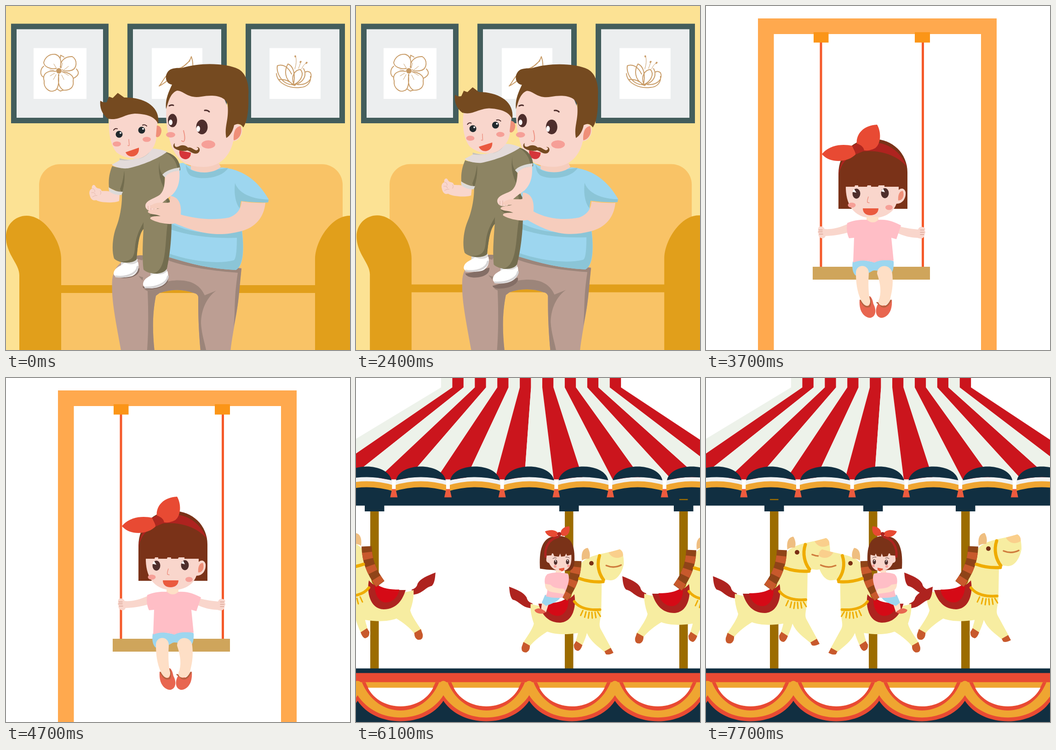
An HTML page that plays this animation: 748 by 748 pixels, repeating every 8100 ms.

```html
<!DOCTYPE html>
<html lang="en">
<head>
<meta charset="utf-8">
<title>Family fun</title>
<style>
html, body { margin: 0; width: 100%; height: 100%; overflow: hidden; background: #fff }
svg { display: block; width: 100%; height: 100% }
.line { fill: none; stroke-linecap: round; stroke-linejoin: round }
.skin { fill: #f9d6cc }
.cheek { fill: #f69f97 }
.ear { fill: #ef8f78 }
.hair { fill: #754a20 }
.girl { fill: #7a3218 }
.red { fill: #ae231f }
.bow { fill: #e84a33 }
.mouth { fill: #ea5a3f }
.eye { fill: #4e2e2c }
.pale { fill: #fedfc6 }
.pink { fill: #ffbec6 }
.blue { fill: #9dd6ef }
.shade { fill: #8bc5d7 }
.arm { fill: #f6cdbd }
.hoof { fill: #c8592c }
.shoe { fill: #e86650 }
.gold { stroke: #efac00 }
</style>
</head>
<body>
<svg viewBox="0 0 748 748">
<defs>
  <g id="horse">
    <path class="red" d="M139 460L137 471C115 470 110 455 95 452C88 445 88 430 87 423C105 430 120 436 126 447C128 455 132 458 139 460Z"/>
    <path fill="#f7eda1" d="M135 461C165 472 205 470 225 445L242 380Q248 366 262 360C280 350 310 348 333 340Q342 345 342 372C338 395 325 410 312 409C302 408 297 405 293 410L292 470C292 495 285 505 290 516L314 560L299 568C285 556 268 545 260 526Q258 535 250 553L234 548C238 535 240 528 240 526C215 530 190 530 172 523C160 530 140 545 133 556L117 549C130 530 140 515 142 505Q133 480 135 461Z"/>
    <path class="hoof" d="M119 546L133 554Q134 565 126 569Q113 571 115 557ZM236 544L250 553Q246 565 240 566Q230 564 231 552ZM299 567L313 559L319 570Q308 576 302 573Z"/>
    <path fill="#efbe80" d="M249 365C247 350 250 338 262 337C267 345 268 355 265 361Q255 360 249 365Z"/>
    <path fill="#facf8c" d="M308 347L333 340C340 344 341 350 340 355C328 362 315 360 308 347Z"/>
    <path class="line" stroke="#d07d3e" stroke-width="3.5" d="M303 376Q320 383 336 375"/>
    <circle cx="270" cy="371" r="5" fill="#7a2f14"/>
    <path class="red" d="M152 461C165 461 215 462 232 440C237 465 230 502 200 503C170 503 158 480 152 461Z"/>
    <path fill="#d50a16" d="M166 460C185 460 205 458 218 446C222 465 212 488 195 488C180 488 168 475 166 460Z"/>
    <path fill="none" stroke="#8f4418" stroke-width="22" d="M237 366C236 395 228 420 207 448"/>
    <path fill="none" stroke="#c8592c" stroke-width="22" stroke-dasharray="15 15" stroke-dashoffset="-13" d="M237 366C236 395 228 420 207 448"/>
    <path class="line gold" stroke-width="7" d="M288 354C281 375 287 395 297 408M244 405C260 411 280 413 296 412"/>
    <path class="line gold" stroke-width="6" d="M232 456C243 471 265 476 289 474"/>
    <path class="line gold" stroke-width="3" d="M251 476L246 487M258 479L255 491M265 480L263 493M271 480L272 493M278 480L280 492M284 479L290 489"/>
  </g>
  <g id="rider" transform="translate(-159 -33.5)">
    <path class="girl" d="M316 416C314 380 318 348 350 345C385 343 392 365 391 400C390 415 385 421 376 421L330 418Z"/>
    <path class="skin" d="M330 383L384 383C386 405 382 421 362 421C347 421 339 412 336 404Q328 402 330 394Z"/>
    <path class="girl" d="M328 388L341 387L343 379L347 389L357 390L360 383L362 390L370 389L373 383L375 388L388 385C388 345 335 345 328 388Z"/>
    <path class="line" stroke="#ae231f" stroke-width="5" d="M328 390C326 370 335 352 355 347"/>
    <path class="bow" d="M327 335C340 330 350 332 355 338L353 345C345 350 332 347 327 335ZM361 338C362 328 372 324 380 324C382 335 378 345 368 345Q362 346 361 338Z"/>
    <circle class="red" cx="358" cy="341" r="4.5"/>
    <ellipse class="eye" cx="350" cy="402" rx="3.7" ry="5.5"/>
    <ellipse class="eye" cx="376" cy="401" rx="3.5" ry="5.5"/>
    <path fill="#fff" d="M348 398h3v4zM374 397h3v4z"/>
    <path class="line" stroke="#4e2e2c" stroke-width="1" d="M344 394q4-3 8-1M372 391q5-1 8 2"/>
    <circle class="cheek" cx="349" cy="411" r="3"/><circle class="cheek" cx="378" cy="410" r="3"/>
    <path class="mouth" d="M357 416L369 414Q370 421 363 422Q358 421 357 416Z"/>
    <path class="pale" d="M350 420H362V428H350Z"/>
    <path class="pale" d="M321 487L335 493L329 511L318 507Z"/>
    <path class="blue" d="M327 473L361 477C357 487 343 492 329 497L320 490Z"/>
    <path class="pink" d="M332 428C345 423 365 424 377 427C383 440 374 462 365 479Q345 481 329 476C333 465 334 458 327 451Q324 435 332 428Z"/>
    <path class="pale" d="M327 449L339 451C345 458 355 459 368 460Q374 468 366 471C350 467 326 470 327 449Z"/>
    <path class="shoe" d="M304 506Q310 501 318 503L328 509Q327 514 318 514Q306 513 304 506Z"/>
  </g>
  <path id="sofaArm" fill="#e19f1b" d="M29 760V585C29 560 0 540 0 502C0 475 20 456 45 456C85 456 120 512 120 550V760Z"/>
</defs>

<g id="home">
  <path fill="#fce294" d="M0 0H748V748H0Z"/>
  <g fill="#eceeef" stroke="#435d5c" stroke-width="12">
    <path d="M17 44.5H217V249H17ZM270 44.5H474V249H270ZM527 44.5H731V249H527Z"/>
  </g>
  <path fill="#fff" d="M60 91.500H175V202H60ZM317 91.500H427V202H317ZM573 91.500H684V202H573Z"/>
  <g class="line" stroke="#c89b66" stroke-width="1.9">
    <path d="M109 136C96 138 83 132 82 123C86 108 98 104 107 105C117 108 122 118 118 133M119 134C117 120 128 109 144 110C156 116 155 137 142 140Q130 143 122 139M122 143C137 144 149 152 146 163C148 176 140 184 125 183C112 176 113 160 115 149M114 149C116 168 113 183 105 184C95 189 81 178 83 163C78 147 90 140 108 142M82 131C75 136 73 148 80 154M118 113L119 107L126 111M153 137C161 145 157 152 147 157M112 181L118 185L124 183"/>
    <path stroke-width="1" d="M106 146L96 152M109 149L103 160M121 150L126 160M124 144L136 151M110 136L104 126M120 135L123 124M104 140L95 139M126 139L136 131"/>
    <circle cx="115" cy="141" r="5" fill="#c89b66"/>
    <path d="M333 174C342 164 344 153 356 145C382 135 398 127 403 110C408 124 407 140 404 160M333 174C350 166 375 140 400 119"/>
    <path d="M625 171C600 172 587 145 590 130C602 125 614 133 621 148M625 171C605 160 605 140 613 126C625 130 630 150 625 171M626 171C618 150 630 139 640 138C650 148 640 165 626 171M629 171C648 165 655 150 647 136M634 171C660 172 667 155 662 145Q656 140 650 144M588 147C590 168 615 180 640 177C655 177 664 165 662 153M594 160Q612 158 624 171"/>
    <path stroke-width="1" d="M628 137Q633 122 630 110M636 136L641 122M643 137Q646 128 653 124"/>
    <path stroke-width="3.500" d="M629 109v1M641 121l-1 1M653 124l1-1M622 170l6 2"/>
  </g>
  <g id="room">
    <path fill="#f9c366" d="M72 760V389A45 45 0 0 1 117 344H687A45 45 0 0 1 732 389V760Z"/>
    <path fill="#e19f1b" d="M115 607H680V624H115Z"/>
    <use href="#sofaArm"/><use href="#sofaArm" transform="matrix(-1 0 0 1 792 0)"/>
    <path fill="#bc9e93" d="M231 595C235 560 260 545 300 543L512 570L506 625C505 660 492 710 487 760H424C418 700 418 660 418 632Q416 625 408 624Q372 611 334 624L326 630C318 670 318 710 324 760H252C240 690 228 640 231 595Z"/>
    <path fill="#9c857a" d="M300 616C325 612 340 598 365 597C400 594 422 606 432 629L457 619C437 633 424 660 424 690C426 720 434 735 437 760H424C418 700 418 660 418 632Q416 625 408 624Q372 611 334 624L326 630C318 670 318 710 324 760H306C311 700 309 650 308 620ZM350 544L512 571L508 612C505 650 499 680 495 698C499 660 495 640 504 580C460 577 390 568 350 552ZM272 546Q290 540 302 543L296 553Q285 550 272 546ZM288 587L298 590L297 597Z"/>
    <path fill="#846e66" d="M237 583C255 582 270 575 290 570C292 585 275 592 255 592Q240 591 237 583ZM297 610C315 606 335 596 352 592C356 605 335 616 312 616Q298 616 297 610Z"/>
    <path class="blue" d="M370 343L385 341Q420 362 470 351C510 355 545 375 571 420L570 427Q540 428 511 424C506 440 512 470 515 505C517 540 515 565 500 574C450 572 400 562 350 543L356 470L360 390Z"/>
    <path class="shade" d="M351 537C400 555 460 562 495 553Q502 550 502 504C450 506 400 500 358 486V472C400 495 460 500 512 484C519 530 515 570 498 574C440 571 400 560 350 545ZM498 385C505 405 530 420 571 421L570 427Q540 428 511 424L508 440C500 430 495 410 498 385ZM391 344C395 360 430 368 455 356L483 352C470 375 420 380 400 368Q391 360 391 344Z"/>
    <path class="arm" d="M402 340H462L467 350C455 362 425 367 402 355Z"/>
    <path class="skin" d="M349 220C350 200 358 185 372 183L400 190H470L490 240L495 258C512 252 518 270 510 283Q504 294 494 294C488 325 465 350 430 350C390 350 375 335 362 310C352 285 346 250 349 220Z"/>
    <path class="ear" d="M510 261C498 263 494 275 495 292C508 290 515 275 510 261Z"/>
    <path class="hair" d="M348 224C346 205 352 190 361 171C343 168 344 143 360 137C370 134 376 135 382 135C420 122 480 124 505 137C524 147 529 175 527 195C528 225 525 250 516 264Q508 252 496 259C494 270 488 282 479 287C474 260 485 250 482 215C478 195 450 192 425 197C395 202 388 185 372 184C355 190 352 215 348 224Z"/>
    <ellipse class="eye" cx="362" cy="249" rx="10" ry="14.500"/><ellipse class="eye" cx="426" cy="263" rx="12.500" ry="16"/>
    <ellipse cx="358" cy="253" rx="4" ry="6" fill="#fff"/><ellipse cx="418" cy="267" rx="4" ry="6.500" fill="#fff"/>
    <path class="line" stroke="#4e2e2c" stroke-width="3" d="M355 217Q360 214 364 216M432 227Q438 226 442 230"/>
    <ellipse class="cheek" cx="358" cy="280" rx="10" ry="6"/><ellipse class="cheek" cx="440" cy="301" rx="15" ry="9"/>
    <path class="line" stroke="#ee9384" stroke-width="2" d="M386 271Q390 285 388 292Q386 297 382 293"/>
    <path fill="#d5353a" d="M377 314L402 319C402 330 395 334 388 333C380 331 376 325 377 314Z"/>
    <path class="hair" d="M367 298C365 308 372 308 378 304C386 301 392 304 396 308C404 305 411 317 416 313C420 311 418 308 414 307C422 305 424 316 417 320C408 324 400 315 394 314C386 317 372 314 366 309C363 306 363 301 367 298Z"/>
  </g>
  <g id="baby">
    <path fill="#dcdad9" d="M250 550H286V566H250ZM314 573H350V589H314Z"/>
    <path fill="#fff" d="M234 582C235 568 250 566 258 558Q275 566 287 556C290 568 288 580 275 587C260 592 234 592 234 582ZM298 605C299 591 314 588 322 581Q340 588 351 576C355 590 352 601 339 608C324 616 298 617 298 605Z"/>
    <path class="line" stroke="#d6d4d5" stroke-width="4" d="M239 588C260 591 284 583 286 567M303 612C325 613 350 604 352 588"/>
    <path class="skin" d="M247 410C228 400 215 403 208 402C205 394 199 399 195 393C192 385 185 390 187 397C182 399 180 405 182 411C184 421 190 424 196 422C205 428 235 429 246 424Z"/>
    <path class="line" stroke="#e5b8ab" stroke-width="1" d="M188 397Q194 398 193 404M186 406Q193 404 194 410M188 415Q194 411 198 412M205 402Q208 406 205 410"/>
    <path fill="#8d8463" d="M231 348C250 357 290 345 345 317C370 322 379 340 379 357L345 370C347 390 345 400 341 408L357 425C362 470 358 520 350 570C345 585 310 585 299 573C296 550 297 520 299 485C290 495 286 520 284 551C275 561 245 560 235 549C229 530 232 500 240 480C248 460 253 430 252 408L224 395C222 375 226 360 231 348Z"/>
    <path fill="#736d4f" d="M345 404L357 425C364 480 357 540 350 570Q345 583 318 582C350 577 345 520 351 475C335 472 322 462 312 455L350 430ZM299 485C290 492 286 520 284 551Q275 561 246 556C275 556 278 545 280 530C282 500 290 488 299 470ZM345 317C370 322 379 340 379 357L373 355Q370 330 345 317ZM257 358Q260 380 252 408L248 398Q255 380 257 358ZM334 336Q331 360 345 372L343 395Q328 365 334 336Z"/>
    <path fill="#dcdad9" d="M223 394Q236 404 254 404L251 411Q232 411 224 402ZM340 367Q350 355 378 351L377 359Q358 358 346 373Z"/>
    <path class="skin" d="M346 372C355 360 370 358 377 359C379 385 372 400 362 410C345 423 333 432 326 444C310 450 300 440 304 430C310 420 325 418 335 410C345 400 345 385 346 372Z"/>
    <path class="line" stroke="#e5b8ab" stroke-width="1.500" d="M309 443V435M315 445V434M321 445L323 434"/>
    <path fill="#e3dbda" d="M230 345C242 338 246 337 250 332C280 338 300 328 316 310C330 310 342 313 350 317C335 330 295 347 265 353C250 354 235 350 230 345Z"/>
    <path fill="#c6c2ba" d="M247 331C280 342 304 330 317 309Q305 340 247 335Z"/>
    <path class="skin" d="M226 238C221 265 225 300 240 318C260 334 290 336 305 324C320 312 328 300 328 270L330 245L300 230Z"/>
    <path class="ear" d="M328 260C336 260 340 268 337 277C334 286 327 287 326 283Z"/>
    <path class="hair" d="M205 206Q212 211 219 209L224 197L232 200L243 189L257 199C300 198 336 218 331 256C325 245 315 235 280 234C255 236 245 250 222 245C212 238 203 225 205 206Z"/>
    <circle cx="246" cy="279" r="7.500" fill="#21292d"/><circle cx="295" cy="270" r="7.500" fill="#21292d"/>
    <circle cx="249" cy="276" r="2" fill="#fff"/><circle cx="298" cy="267" r="2" fill="#fff"/>
    <path class="line" stroke="#4e2e2c" stroke-width="2" d="M234 270Q237 265 242 267M297 259Q302 257 306 261"/>
    <ellipse class="cheek" cx="241" cy="300" rx="9" ry="5.500"/><ellipse class="cheek" cx="306" cy="290" rx="9" ry="5.500"/>
    <path class="line" stroke="#ee9384" stroke-width="1.500" d="M267 290L268 303Q267 305 265 303"/>
    <path class="mouth" d="M260 318L289 308C290 320 283 326 276 327C267 328 262 323 260 318Z"/>
  </g>
  <path id="forearm" class="arm"/>
  <path id="hand" class="arm" d="M380 455C382 435 378 415 357 413L356 427C345 430 332 424 318 432C310 437 314 441 322 440L334 440C322 443 306 443 309 449C316 454 326 452 336 457C324 457 312 457 314 463C325 470 345 474 356 474C368 474 376 470 380 466Z"/>
</g>

<g id="swing">
  <path fill="#fff" d="M0 0H748V748H0Z"/>
  <path fill="#ffa94e" d="M113 748V27H632V748H598V61H147.500V748Z"/>
  <g id="swinger">
    <path fill="#cfa55b" d="M232 567H487V595H232Z"/>
    <path fill="none" stroke="#f55a2b" stroke-width="5" d="M250 78V567M471.500 78V567"/>
    <path fill="#fb9517" d="M234 57H266.500V79.500H234ZM454 57H487V79.500H454Z"/>
    <path class="girl" d="M288 441V365C288 320 320 289 363 289C405 289 438 320 438 362V441Z"/>
    <path class="skin" d="M304 390C303 430 320 461 362 461C390 461 408 448 414 430C428 430 435 418 434 405C432 396 424 395 419 400V390Z"/>
    <path class="ear" d="M428 402C420 402 417 412 418 423C428 423 432 412 428 402Z"/>
    <path class="girl" d="M302 393H323L330 373L331 393H350L357 373L359 393H374L388 364V393H421L436 360C420 320 310 320 290 360Z"/>
    <path class="red" d="M288 374C290 350 300 332 330 318C370 310 415 322 437 350C425 322 405 303 377 298L330 306C300 325 288 345 288 374Z"/>
    <path class="bow" d="M252 322C270 300 300 300 318 304L326 322C310 340 270 344 252 322ZM328 303C325 280 340 260 372 258C382 275 380 300 368 309C355 316 343 315 340 312Z"/>
    <path fill="#ae281f" d="M317 304L328 299Q343 304 344 315L325 323Q325 312 317 304Z"/>
    <ellipse class="eye" cx="327" cy="408" rx="8.500" ry="11"/><ellipse class="eye" cx="389" cy="407" rx="8.500" ry="11"/>
    <path fill="#fff" d="M318 404L322 398L327 406ZM381 403L385 397L389 405Z"/>
    <ellipse class="cheek" cx="317" cy="433" rx="8.500" ry="5.500"/><ellipse class="cheek" cx="398" cy="438" rx="8" ry="5.500"/>
    <path class="line" stroke="#ee9384" stroke-width="1.500" d="M353 415Q350 424 351 427L355 428"/>
    <path class="mouth" d="M341 440H375C375 450 367 455 358 455C347 455 341 449 341 440Z"/>
    <path class="skin" d="M308 474C290 482 275 486 258 485Q254 477 246 480Q242 484 245 488Q241 491 245 495Q243 503 252 505Q258 506 260 500C280 500 295 496 311 492ZM420 479C435 483 450 485 461 486Q464 478 473 481Q479 484 475 488Q479 492 475 496Q476 504 467 506L459 504C445 504 430 500 415 493Z"/>
    <path class="line" stroke="#dca799" stroke-width="1.500" d="M245 487H253M245 491H253M246 496H254M466 487H474M466 492H474M466 497H474"/>
    <path class="pale" d="M349 458H375V468L362 474L349 468Z"/>
    <path class="blue" d="M319 556C335 548 350 555 363 556C380 550 395 548 408 555C409 570 406 582 398 585Q370 572 362 576L355 580L325 586C319 580 317 570 319 556Z"/>
    <path class="pink" d="M307 472C320 466 335 464 350 465Q363 476 375 465C395 463 410 470 424 477L414 507L403 504L408 554Q380 550 366 558Q340 549 320 558L322 504L311 505Q304 490 307 472Z"/>
    <path class="shoe" id="shoe" d="M334 638Q333 650 336 660C340 672 350 679 358 678C370 675 371 660 364 648C362 636 358 630 354 631L355 648Q345 658 334 638Z"/>
    <use href="#shoe" transform="matrix(-1 0 0 1 738 0)"/>
    <path class="line" stroke="#b5613f" stroke-width="3" d="M336 640Q345 658 356 653Q360 642 355 633M402 640Q393 658 382 653Q378 648 372 645"/>
    <path class="pale" d="M326 580C326 560 355 560 354 582C352 610 354 630 357 640C358 656 345 656 337 640C328 620 326 600 326 580ZM372 582C372 560 403 560 405 582C408 610 403 625 400 640C392 656 374 654 375 642C382 625 380 605 372 582Z"/>
  </g>
</g>

<g id="ride">
  <path fill="#fff" d="M0 0H748V760H0Z"/>
  <g id="poles"></g>
  <g id="tent" transform="translate(0 -1.500)"></g>
  <g id="horses"></g>
</g>
</svg>
<script>
const $ = id => document.getElementById(id);
const shape = (fill, d) => `<path fill="${fill}" d="${d}"/>`;
const navy = '#112f41', coral = '#e84a33', amber = '#efa531', brass = '#9c6c00';

function tent() {
  let s = '';
  for (let i = 0; i < 16; i++) {
    const x = 185 + 24.45 * i, b = -146 + 64 * i;
    s += shape(i % 2 ? '#cb151d' : '#edf2ea',
      `M${x} -5V22L${b} 222H${b + 64}L${x + 24.45} 22V-5Z`);
  }
  s += shape(navy, 'M0 238H748V279H0Z');
  for (let i = 0; i < 7; i++) {
    const c = 23.3 + 117.8 * i, l = c - 59, r = c + 59;
    const band = (top, bottom) =>
      `M${l} ${top}Q${c} ${top - 18} ${r} ${top}V${bottom}Q${c} ${bottom - 18} ${l} ${bottom}Z`;
    s += shape('#f0f1f2', band(226, 237)) + shape(amber, band(235, 248)) +
      shape(navy, `M${c - 54} 224C${c - 46} 184 ${c + 46} 184 ${c + 54} 224Q${c} 210 ${c - 54} 224Z`);
  }
  for (let i = 0; i < 6; i++) {
    const x = 82.3 + 117.7 * i;
    s += shape('#fff', `M${x - 4} 223H${x + 4}V244H${x - 4}Z`) +
      shape('#ed5b3e', `M${x - 4} 243H${x + 4}L${x + 8} 261H${x - 8}Z`);
  }
  s += shape(navy, 'M0 633H748V760H0Z') + shape(coral, 'M0 643H748V664H0Z');
  // nested curves of the festoons, from the outside in
  const rings = [[coral, 93.5, 703, 55, 763], [amber, 93.5, 691, 52, 756],
    [coral, 84, 663, 50, 745], [amber, 76, 663, 48, 733], ['#fff', 71, 675, 44, 729]];
  for (const [fill, w, y, k, low] of rings)
    for (let c = -89.7; c < 850; c += 186.5) {
      const top = fill == '#fff' ? y : 663;
      s += shape(fill, `M${c - w} ${top}V${y}C${c - k} ${low} ${c + k} ${low} ${c + w} ${y}V${top}Z`);
    }
  for (let x = 3.5; x < 748; x += 186.5) s += `<circle cx="${x}" cy="669" r="9" fill="${amber}"/>`;
  return s;
}
$('tent').innerHTML = tent();

// pole position at each step, negative when facing left
const riders = [
  { dy: 8, x: [630, 712, -565, -408, -270, 148], tall: true },
  { dy: 0, x: [-121, -40, 95, 220, 392, 564] },
  { dy: 32, x: [379, 463, 547, 631, -574, -363], girl: true }
];
const tilt = [0, -1, -2.5, -4, -5.2, -1.5, 0.4, 1, 1.5];
const lift = [0, -4, -7, -8, -7, -7.5, -6, -3, -11];
const shrink = [0, 0.5, 0.7, 0.9, 1];

function drawHome(i) {
  const k = 1 - 0.0045 * shrink[Math.min(i, 4)];
  $('room').setAttribute('transform', `translate(295 270) scale(${k}) translate(-295 -270)`);
  $('baby').setAttribute('transform', `translate(0 ${lift[i]}) rotate(${tilt[i]} 300 590)`);
  // the hand follows the baby, the elbow stays
  const a = tilt[i] * Math.PI / 180;
  const dx = 225 * Math.sin(a), dy = 45 * Math.sin(a) + lift[i] * 0.8;
  $('hand').setAttribute('transform', `translate(${dx} ${dy})`);
  const p = (x, y) => `${x + dx} ${y + dy}`;
  $('forearm').setAttribute('d', `M512 425Q540 429 564 428C561 460 542 482 510 490
    C470 500 430 500 ${p(366, 472)}L${p(378, 453)}C415 464 455 466 485 460Q511 450 512 425Z`);
}

function drawRide(i) {
  const bar = (l, top, r, bottom) => `M${l} ${top}H${r}V${bottom}H${l}Z`;
  const small = 'transform="translate(4.84 8) scale(.978)"';
  let poles = '', horses = '';
  for (const { dy, x: xs, girl, tall } of riders) {
    const x = Math.abs(xs[i]), side = Math.sign(xs[i]);
    poles += shape(brass, bar(x - 9, 275, x + 9.5, 632)) +
      shape(navy, bar(x - 21, 275, x + 21.5, 290));
    if (tall && i) horses += shape(brass, bar(x - 9, 263, x + 9.5, 265.5));
    horses += `<g transform="translate(${x} ${dy}) scale(${side} 1) translate(-220 0)">
      <use href="#horse" ${girl ? small : ''}/>${girl ? '<use href="#rider"/>' : ''}</g>`;
  }
  $('poles').innerHTML = poles;
  $('horses').innerHTML = horses;
  $('ride').setAttribute('transform', `translate(0 ${i ? 0 : 1.5})`);
}

const scenes = [
  { id: 'home', start: 0, step: 300, draw: drawHome },
  { id: 'swing', start: 2700, step: 500, draw: i =>
    $('swinger').setAttribute('transform', i % 2 ? 'matrix(-1 0 0 1 719 0)' : '') },
  { id: 'ride', start: 5700, step: 400, draw: drawRide }
];
let last = '';
function frame() {
  const t = performance.now() % 8100;
  const scene = scenes.findLast(s => t >= s.start);
  const i = Math.floor((t - scene.start) / scene.step);
  if (last != scene.id + i) {
    last = scene.id + i;
    for (const s of scenes) $(s.id).style.display = s == scene ? '' : 'none';
    scene.draw(i);
  }
  requestAnimationFrame(frame);
}
frame();
</script>
</body>
</html>
```
